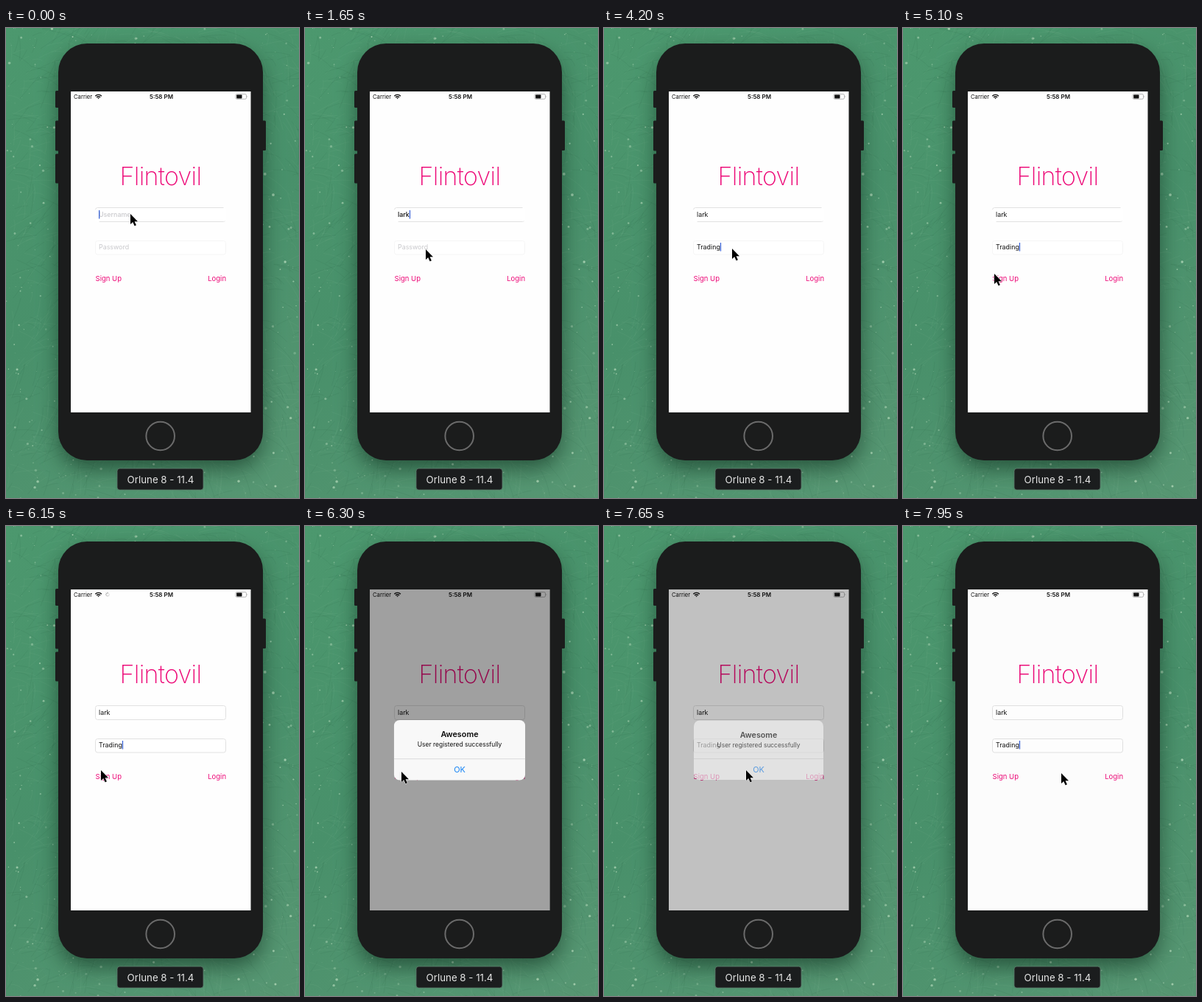
Recreate the animation shown at these times as an HTML page with a canvas. Size 398 by 637 pixels, loop 8000 ms.

```html
<!DOCTYPE html>
<html lang="en">
<head>
<meta charset="utf-8">
<title>Sign up demo</title>
<style>
  html, body { margin: 0; width: 100%; height: 100%; overflow: hidden; background: #4a9069; }
  canvas, svg { position: absolute; left: 0; top: 0; width: 398px; height: 637px; display: block; }
  text { font-family: Inter, Roboto, "Open Sans", sans-serif; white-space: pre; }
  .mid { text-anchor: middle; }
  .field { font-size: 8.9px; fill: #111; }
  .hint { fill: #c9c9cc; }
  .link { font-size: 9.5px; fill: #ed0a78; }
</style>
</head>
<body>
<canvas id="wall" width="398" height="637"></canvas>
<svg viewBox="0 0 398 637">
  <defs>
    <clipPath id="screenClip"><rect x="88" y="86" width="244.5" height="435"/></clipPath>
    <clipPath id="alertClip"><rect x="122" y="263.5" width="176" height="80.5" rx="8"/></clipPath>
    <filter id="soft" x="-50%" y="-50%" width="200%" height="200%"><feGaussianBlur stdDeviation="4"/></filter>
  </defs>

  <!-- phone -->
  <g fill="#1b1c1c">
    <rect x="67" y="85" width="6" height="23" rx="1.5"/>
    <rect x="67" y="125.500" width="6" height="41" rx="1.5"/>
    <rect x="67" y="170.500" width="6" height="40" rx="1.5"/>
    <rect x="347" y="125.500" width="6" height="40.500" rx="1.5"/>
    <rect x="71" y="21" width="278" height="565" rx="39"/>
  </g>
  <circle cx="209.700" cy="553" r="19.300" fill="none" stroke="#6b6b6b" stroke-width="2"/>
  <rect x="151" y="597" width="117" height="29" rx="3.500" fill="#1b1d1e" stroke="#5f7d6d" stroke-width=".8"/>
  <text class="mid" x="210" y="616.500" font-size="13.300" fill="#e6e6e6">Orlune 8 - 11.4</text>

  <!-- screen -->
  <g clip-path="url(#screenClip)">
    <rect x="88" y="86" width="245" height="435" fill="#fefefe"/>
    <text x="92" y="95.500" font-size="7.700" fill="#111">Carrier</text>
    <g fill="none" stroke="#111" stroke-width="1.400">
      <path d="M121.300 92.200 A6 6 0 0 1 129.900 92.200"/>
      <path d="M123.100 94 A3.500 3.500 0 0 1 128.100 94"/>
    </g>
    <path d="M124.300 94.900 Q125.600 93.900 126.900 94.900 L125.600 96.300 Z" fill="#111"/>
    <g id="spin" stroke="#555" stroke-width=".8"></g>
    <text class="mid" x="211" y="95.500" font-size="8" font-weight="600" fill="#111">5:58 PM</text>
    <rect x="312" y="89.700" width="14.500" height="6.600" rx="1.600" fill="none" stroke="#999" stroke-width=".7"/>
    <rect x="313.200" y="90.600" width="7.300" height="4.800" rx=".7" fill="#111"/>
    <path d="M327.600 91.700 q1.400 1.300 0 2.600 z" fill="#999"/>

    <text class="mid" x="210" y="213" font-size="34" font-weight="200" letter-spacing="-.7" fill="#ed0a78">Flintovil</text>

    <rect id="userBox" x="121.500" y="243.500" width="177" height="19" rx="3" fill="#fff" stroke="#dedede" stroke-width=".9"/>
    <rect id="passBox" x="121.500" y="288.500" width="177" height="18.500" rx="3" fill="#fff" stroke="#dedede" stroke-width=".9"/>
    <text id="user" class="field" x="126" y="256"></text>
    <text id="pass" class="field" x="126" y="300"></text>
    <rect id="caret" width="1.300" height="11.500" fill="#3d66d8"/>

    <text id="signUp" class="link" x="121.600" y="342.500">Sign Up</text>
    <text class="link" x="299" y="342.500" text-anchor="end">Login</text>

    <rect id="dim" x="88" y="86" width="245" height="435" fill="#000"/>
    <g id="alert">
      <g clip-path="url(#alertClip)">
        <rect x="122" y="263" width="176" height="82" fill="#f8f8f8"/>
        <rect id="press" x="122" y="315.500" width="176" height="29" fill="#e7e7e7"/>
        <ellipse id="glow" cx="137" cy="340" rx="17" ry="13" fill="#f0d3dc" filter="url(#soft)"/>
        <path d="M122 315.500 H298" stroke="#d4d4d6" stroke-width=".8"/>
      </g>
      <text class="mid" x="210" y="286.500" font-size="10.700" font-weight="600" fill="#0a0a0a">Awesome</text>
      <text class="mid" x="210" y="299.500" font-size="8.400" fill="#111">User registered successfully</text>
      <text class="mid" x="210" y="334" font-size="10.800" fill="#1482f5">OK</text>
    </g>
  </g>

  <path id="mouse" d="M0 0 V14 L3.200 11 L5.600 16.300 L7.900 15.300 L5.600 10.200 H10 Z"
        fill="#000" stroke="#fff" stroke-width="1" stroke-linejoin="round" paint-order="stroke"/>
</svg>

<script>
const LOOP = 8000;
const $ = id => document.getElementById(id);

// Tables of [start ms, value...]; each row holds until the next.
const mouseSteps = [
  [0, 169, 252], [1200, 170, 258], [1350, 168, 272], [1500, 165, 289],
  [1650, 164, 300], [1800, 163, 313], [1950, 168, 302],
  [4200, 174, 299], [4350, 192, 304], [4500, 224, 318], [4650, 250, 331],
  [4800, 230, 334], [4950, 178, 334], [5100, 124, 333], [5250, 124, 332],
  [6000, 128, 331], [6150, 129, 331], [6300, 131, 333], [6450, 142, 332],
  [6600, 155, 330], [6750, 168, 328], [6900, 178, 328], [7050, 184, 328],
  [7200, 186, 328], [7650, 193, 331], [7800, 206, 334], [7950, 215, 335]
];
const userSteps = [[0, 0], [300, 1], [450, 2], [600, 4]];
const passSteps = [[0, 0], [2550, 1], [3150, 3], [3300, 4], [3600, 6], [3750, 7]];
// dim, alert opacity, alert scale
const alertSteps = [
  [0, 0, 0, 1], [6300, .372, 1, 1.014], [6450, .39, 1, 1.005], [6600, .4, 1, 1],
  [7650, .24, .6, 1], [7800, .06, .15, 1], [7950, .006, 0, 1]
];

function at(steps, t) {
  let row = steps[0];
  for (const s of steps) if (s[0] <= t) row = s;
  return row.slice(1);
}

function typed(id, word, hint, n) {
  const el = $(id), text = n ? word.slice(0, n) : hint;
  if (el.textContent !== text) el.textContent = text;
  el.classList.toggle("hint", !n);
  return 126 + (n ? el.getComputedTextLength() : 0);
}

function show(id, on) { $(id).setAttribute("opacity", +on); }

function drawWall() {
  const c = $("wall").getContext("2d");
  let seed = 77;
  const rnd = () => (seed = seed * 16807 % 2147483647) / 2147483647;
  const g = c.createLinearGradient(0, 0, 398, 637);
  g.addColorStop(0, "#4c986e");
  g.addColorStop(.5, "#48906a");
  g.addColorStop(1, "#579672");
  c.fillStyle = g;
  c.fillRect(0, 0, 398, 637);

  c.lineWidth = .6;
  for (let i = 0; i < 1500; i++) {
    const x = rnd() * 398, y = rnd() * 637, len = 12 + rnd() * 35;
    const a = (x > 200 ? .6 : -.5) + (rnd() - .5) * 2.2;
    c.strokeStyle = rnd() < .55 ? "rgba(145,200,165,.15)" : "rgba(25,80,52,.14)";
    c.beginPath();
    c.moveTo(x, y);
    c.quadraticCurveTo(x + Math.cos(a) * len / 2 + 3, y + Math.sin(a) * len / 2 - 3,
      x + Math.cos(a) * len, y + Math.sin(a) * len);
    c.stroke();
  }
  for (let i = 0; i < 650; i++) {
    c.fillStyle = `rgba(180,218,186,${.25 + rnd() * .55})`;
    c.beginPath();
    c.arc(rnd() * 398, rnd() * 637, .4 + rnd() ** 3 * 1.5, 0, 7);
    c.fill();
  }
  c.shadowColor = "rgba(0,25,12,.55)";
  c.shadowBlur = 30;
  c.shadowOffsetY = 12;
  c.fillStyle = "#1b1c1c";
  c.beginPath();
  c.roundRect(73, 23, 274, 561, 37);
  c.fill();
}

function buildSpinner() {
  for (let i = 0; i < 8; i++) {
    const l = document.createElementNS("http://www.w3.org/2000/svg", "path");
    l.setAttribute("d", "M138 91.400 V89.800");
    l.setAttribute("transform", `rotate(${i * 45} 138 92.800)`);
    l.setAttribute("opacity", .2 + i * .1);
    $("spin").append(l);
  }
}

function render(t) {
  const [mx, my] = at(mouseSteps, t);
  $("mouse").setAttribute("transform", `translate(${mx} ${my})`);

  const inPass = t >= 1800;
  $("user").setAttribute("font-weight", inPass ? 400 : 500);
  const ux = typed("user", "lark", "Username", at(userSteps, t)[0]);
  const px = typed("pass", "Trading", "Password", at(passSteps, t)[0]);
  $("caret").setAttribute("x", inPass ? px : ux);
  $("caret").setAttribute("y", inPass ? 291 : 247);
  show("caret", t < 6300 || t >= 7800);

  const crisp = t >= 5250;
  $("userBox").setAttribute("stroke-dasharray", crisp ? "none" : "171 20 171 20");
  $("userBox").setAttribute("stroke-dashoffset", 0);
  $("passBox").setAttribute("stroke", crisp ? "#dedede" : "#f4f4f4");

  show("spin", t >= 5850 && t < 6300);
  $("spin").setAttribute("transform", `rotate(${Math.floor(t / 150) * 45} 138 92.800)`);
  $("signUp").setAttribute("opacity", t >= 5550 && t < 5850 ? .35 : 1);

  const [dim, alpha, scale] = at(alertSteps, t);
  $("dim").setAttribute("opacity", dim);
  show("alert", alpha);
  $("alert").setAttribute("transform",
    `translate(210 304) scale(${scale}) translate(-210 -304)`);
  show("press", t >= 7350 && t < 7650);
  show("glow", t >= 7350 && t < 7650);
}

function tick() {
  render(performance.now() % LOOP);
  requestAnimationFrame(tick);
}

drawWall();
buildSpinner();
tick();
</script>
</body>
</html>
```
